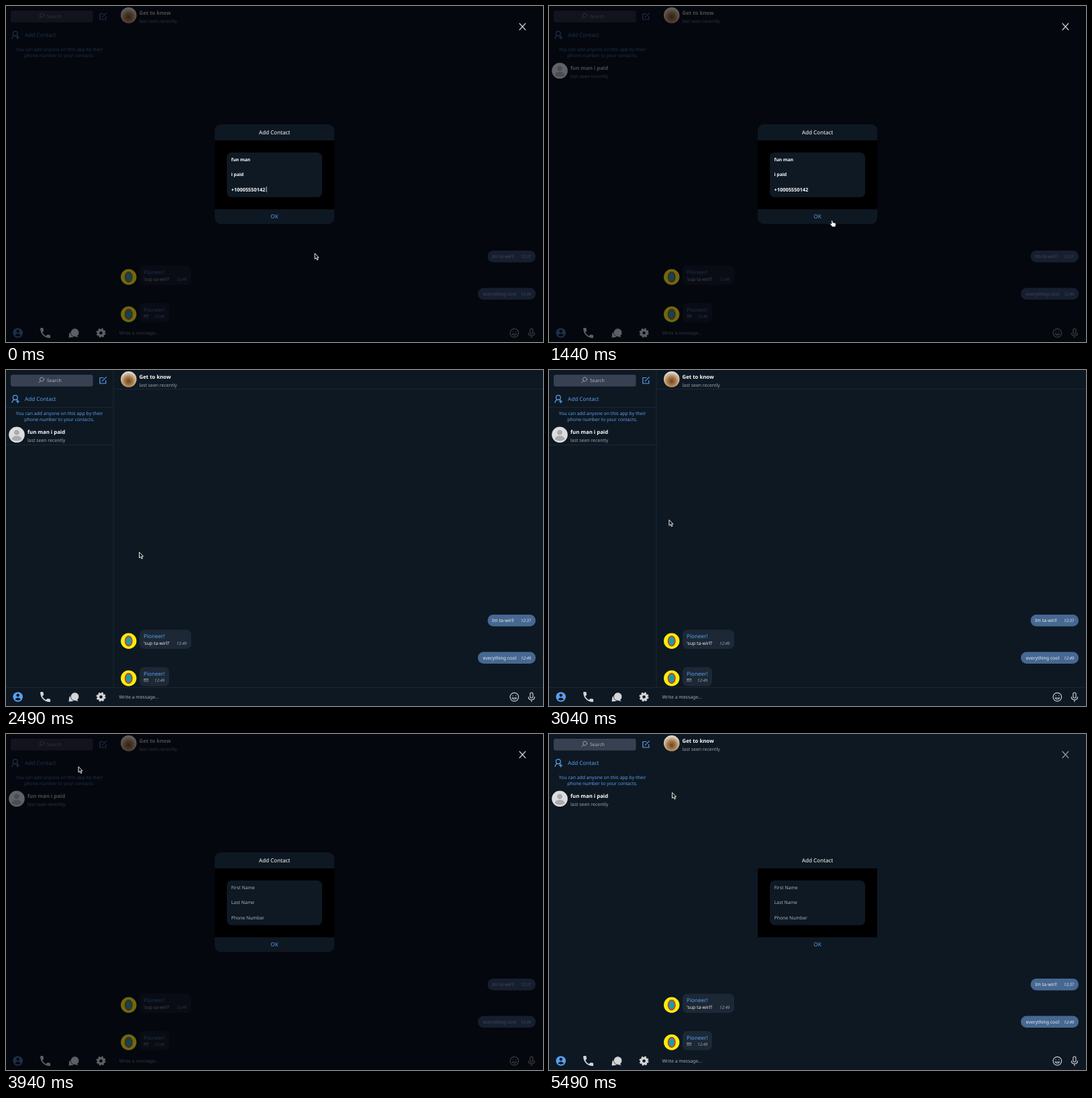
These frames come from a looping animation (800x500 px, 5540 ms). An HTML page:

```html
<!DOCTYPE html>
<html lang="en">
<head>
<meta charset="utf-8">
<title>Add Contact</title>
<style>
  html, body { margin: 0; width: 100%; height: 100%; overflow: hidden; background: #0e1822; }
  svg { display: block; width: 800px; height: 500px; }
  text { font: 500 6.9px "Noto Sans", "Open Sans", sans-serif; fill: #e8ecf0; text-rendering: geometricPrecision; }
  .big { font-size: 8.1px; }
  .strong { font-weight: 600; font-size: 7.8px; fill: #fff; }
  .blue { fill: #5a9fee; }
  .soft { fill: #9da5ae; font-weight: 400; }
  .time { font-size: 6.2px; font-style: italic; fill: #dfe6ef; }
  .in .time { fill: #9aa5b0; }
  .mid { text-anchor: middle; }
  .icon { fill: none; stroke: #5a9fee; stroke-width: 1.2; stroke-linecap: round; stroke-linejoin: round; }
  .gray .icon, .icon.gray { stroke: #c6cace; }
  .in rect { fill: #1c2835; }
  .out rect { fill: #466892; }
  #lines { stroke: #1b2632; stroke-width: 1; }
  #lens { stroke: #a9b1bc; stroke-width: .9; }
  #cross { stroke: #cfcfcf; stroke-width: 1.2; }
  #filled text { font-weight: 600; font-size: 6.8px; fill: #fff; }
  #filled .number { font-size: 7.4px; }
  #empty text { font-weight: 500; fill: #a9b0b7; }
</style>
</head>
<body>
<svg viewBox="0 0 800 500">
  <defs>
    <radialGradient id="photo" cx=".5" cy=".62" r=".6">
      <stop offset="0" stop-color="#6a4526"/>
      <stop offset=".45" stop-color="#a87a48"/>
      <stop offset="1" stop-color="#e9e3dc"/>
    </radialGradient>
    <g id="face">
      <circle r="11.7" fill="#f8ee0c"/>
      <ellipse rx="5.2" ry="7.3" fill="#1f9c9c" stroke="#d5302a" stroke-width="1.6"/>
    </g>
  </defs>
  <rect width="800" height="500" fill="#0e1822"/>
  <path id="lines" d="M160 0V472.500M160 28.500H800M0 472.500H800M0 55.500H160M0 111.500H160"/>

  <!-- sidebar -->
  <rect x="7" y="7" width="122.500" height="17.500" rx="3" fill="#384152"/>
  <path id="lens" class="icon" d="M51.300 16.200L48.800 18.800M56.500 14A3 3 0 1 1 56.500 13.900Z"/>
  <text x="61" y="18" style="fill:#a9b1bc">Search</text>
  <path class="icon" d="M145 11.500H139.800V20H148.700V15.500M143.200 16.700L149.300 10.600"/>
  <g class="icon">
    <circle cx="13.800" cy="41" r="3.400"/>
    <path d="M9 48.500C9.300 46 10.600 44.700 12.500 44.400M15 44.400L16 45M17.500 44.700V49M15.400 46.900H19.600"/>
  </g>
  <text class="big blue" x="28" y="46">Add Contact</text>
  <text class="blue mid" x="79.500" y="66.500">You can add anyone on this app by their</text>
  <text class="blue mid" x="79.500" y="75.500">phone number to your contacts.</text>
  <g class="contact">
    <text class="strong" x="32" y="95">fun man i paid</text>
    <text class="soft" x="32" y="106.500">last seen recently</text>
  </g>
  <circle cx="17.700" cy="486.500" r="7.300" fill="#5a9fee"/>
  <g fill="#0e1822">
    <circle cx="17.700" cy="484" r="2.300"/>
    <path d="M13.200 490.300Q17.700 484.800 22.200 490.300Q17.700 493.200 13.200 490.300"/>
  </g>

  <!-- conversation -->
  <text class="strong" x="198.500" y="13">Get to know</text>
  <text class="soft" x="198.500" y="24.500">last seen recently</text>
  <g class="out">
    <rect x="717.500" y="364" width="71.500" height="17.500" rx="8.500"/>
    <text x="724" y="375">Im ta-wirl!</text>
    <text class="time" x="767" y="375">12:37</text>
    <rect x="703" y="419.500" width="86" height="17.500" rx="8.500"/>
    <text x="710.500" y="430.500">everything cool</text>
    <text class="time" x="767" y="430.500">12:49</text>
  </g>
  <g class="in">
    <rect x="199" y="386.500" width="77" height="28.500" rx="7"/>
    <text class="big blue" x="205" y="399">Pioneer!</text>
    <text x="205" y="408.500">'sup ta-wirl?</text>
    <text class="time" x="254" y="408.500">12:49</text>
    <rect x="199" y="442" width="44" height="28.500" rx="7"/>
    <text class="big blue" x="205" y="454.500">Pioneer!</text>
    <text x="205" y="464">!!!!</text>
    <text class="time" x="221" y="464">12:49</text>
  </g>
  <text x="168.500" y="489" style="fill:#a9b0b8">Write a message...</text>
  <g class="icon gray">
    <circle cx="757.300" cy="486.600" r="6.300"/>
    <path d="M753.800 488Q757.300 492.500 760.800 488ZM755 484.600V484.800M759.600 484.600V484.800"/>
    <rect x="780.800" y="480" width="4.200" height="8" rx="2.100"/>
    <path d="M778.300 486.500C778.500 492.200 787.300 492.200 787.500 486.500M782.900 491V493.500"/>
  </g>

  <rect id="shade" width="800" height="500" fill="#020006"/>

  <!-- avatars and toolbar keep more of their light under the shade -->
  <g id="bright">
    <circle cx="182.700" cy="13.800" r="11.800" fill="url(#photo)"/>
    <use href="#face" x="182.700" y="403.300"/>
    <use href="#face" x="182.700" y="458.800"/>
    <g class="contact">
      <circle cx="16" cy="96.300" r="11.800" fill="#dcdddf"/>
      <g fill="#a9abae">
        <circle cx="16" cy="93" r="3.800"/>
        <path d="M8.500 103Q9.500 98 16 98T23.500 103Q16 108.500 8.500 103"/>
      </g>
    </g>
    <g fill="#d3d5d8">
      <path transform="translate(48.600 476.600) scale(.83)" d="M6.620 10.790c1.440 2.830 3.760 5.140 6.590 6.590l2.200-2.200c.27-.27.67-.36 1.020-.24 1.120.37 2.330.57 3.570.57.55 0 1 .45 1 1V20c0 .55-.45 1-1 1-9.390 0-17-7.610-17-17 0-.55.45-1 1-1h3.500c.55 0 1 .45 1 1 0 1.250.2 2.450.57 3.570.11.35.03.74-.25 1.020z"/>
      <path d="M93.500 493.500L94 489A4 4 0 1 1 98 493Z"/>
      <path d="M108 493.500L106.500 490.800A6.200 6.200 0 1 0 103 492.200Z" stroke="#0e1822" stroke-width=".7"/>
    </g>
    <g fill="none" stroke="#d3d5d8">
      <circle cx="141.500" cy="486.500" r="4" stroke-width="3.400"/>
      <circle cx="141.500" cy="486.500" r="6" stroke-width="2" stroke-dasharray="2.700 2.012"/>
    </g>
  </g>

  <!-- dialog -->
  <g id="dialog">
    <path id="cross" class="icon" d="M765 26L773.800 35.500M773.800 26L765 35.500"/>
    <rect x="311" y="176" width="178" height="148.500" rx="9" fill="#0e1822"/>
    <rect x="311" y="200" width="178" height="102.500"/>
    <rect x="329" y="218" width="142" height="66.500" rx="7" fill="#0f1924"/>
    <text class="big mid" x="400" y="190.500" style="fill:#fff">Add Contact</text>
    <g id="filled">
      <text x="335.500" y="231.300">fun man</text>
      <text x="335.500" y="253.300">i paid</text>
      <text class="number" x="335.500" y="275.500">+10005550142</text>
    </g>
    <g id="empty">
      <text x="335.500" y="231.300">First Name</text>
      <text x="335.500" y="253.300">Last Name</text>
      <text x="335.500" y="275.500">Phone Number</text>
    </g>
    <path id="caret" d="M388 268.800V277" stroke="#fff" stroke-width=".8"/>
    <text class="big blue mid" x="400" y="316.300">OK</text>
  </g>

  <g id="pointer" stroke-linejoin="round">
    <path id="arrow" d="M0 0V8.600L2 6.800L3.500 10L5 9.300L3.500 6.300H6Z" fill="#111" stroke="#fff" stroke-width=".9"/>
    <path id="hand" d="M-.8 .8Q0-.5 .9 .8L1.500 3.400L4.700 4Q6 4.500 5.700 6.500L5 9.500H.6L-2.700 5.600Q-2.400 4.300-.3 5.300Z" fill="#fff" stroke="#222" stroke-width=".5"/>
  </g>
</svg>
<script>
  const LOOP = 5540;
  const ADDED = 1140, CLOSED = 1890, HIDDEN = 2140, OPENED = 3770, CLOSED_AGAIN = 5340;
  // time, x, y of the pointer tip
  const path = [
    [0, 460, 368], [620, 460, 368], [1000, 421.5, 319], [1600, 421.5, 319],
    [1860, 248, 309], [2240, 248, 309], [2470, 198.5, 271], [2870, 198.5, 271],
    [3440, 108, 48.5], [4240, 108, 48.5], [4840, 183.5, 87], [LOOP, 183.5, 87]
  ];
  const el = id => document.getElementById(id);
  const show = (node, on) => node.setAttribute("visibility", on ? "inherit" : "hidden");
  const contacts = document.querySelectorAll(".contact");

  function pointerAt(t) {
    const i = path.findIndex(p => p[0] > t);
    const [t0, x0, y0] = path[i - 1], [t1, x1, y1] = path[i];
    const k = (t - t0) / (t1 - t0), ease = k * k * (3 - 2 * k);
    return [x0 + (x1 - x0) * ease, y0 + (y1 - y0) * ease];
  }

  function shadeAt(t) {
    if (t < CLOSED) return 1;
    if (t >= CLOSED_AGAIN) return 0;
    return Math.min(1, Math.max(0, (t - OPENED) / 120));
  }

  function draw(t) {
    const shade = shadeAt(t);
    const open = t < HIDDEN || t >= OPENED;
    const first = t < HIDDEN;
    const [x, y] = pointerAt(t);
    const overOk = shade > 0 && x > 311 && x < 489 && y > 302 && y < 324;
    const overAdd = !open && x < 160 && y > 30 && y < 56;

    el("shade").setAttribute("opacity", shade * 0.7);
    el("bright").setAttribute("opacity", 1 - shade * 0.57);
    el("cross").setAttribute("opacity", shade ? 1 : 0.7);
    el("dialog").setAttribute("opacity", first || t >= CLOSED_AGAIN ? 1 : shade);
    show(el("lines"), !open);
    show(el("dialog"), open);
    show(el("filled"), first);
    show(el("empty"), !first);
    show(el("caret"), t < 530);
    contacts.forEach(c => show(c, t >= ADDED));
    el("pointer").setAttribute("transform", `translate(${x} ${y})`);
    show(el("hand"), overOk || overAdd);
    show(el("arrow"), !(overOk || overAdd));
  }

  const start = performance.now();
  function tick() {
    draw((performance.now() - start) % LOOP);
    requestAnimationFrame(tick);
  }
  tick();
</script>
</body>
</html>
```
